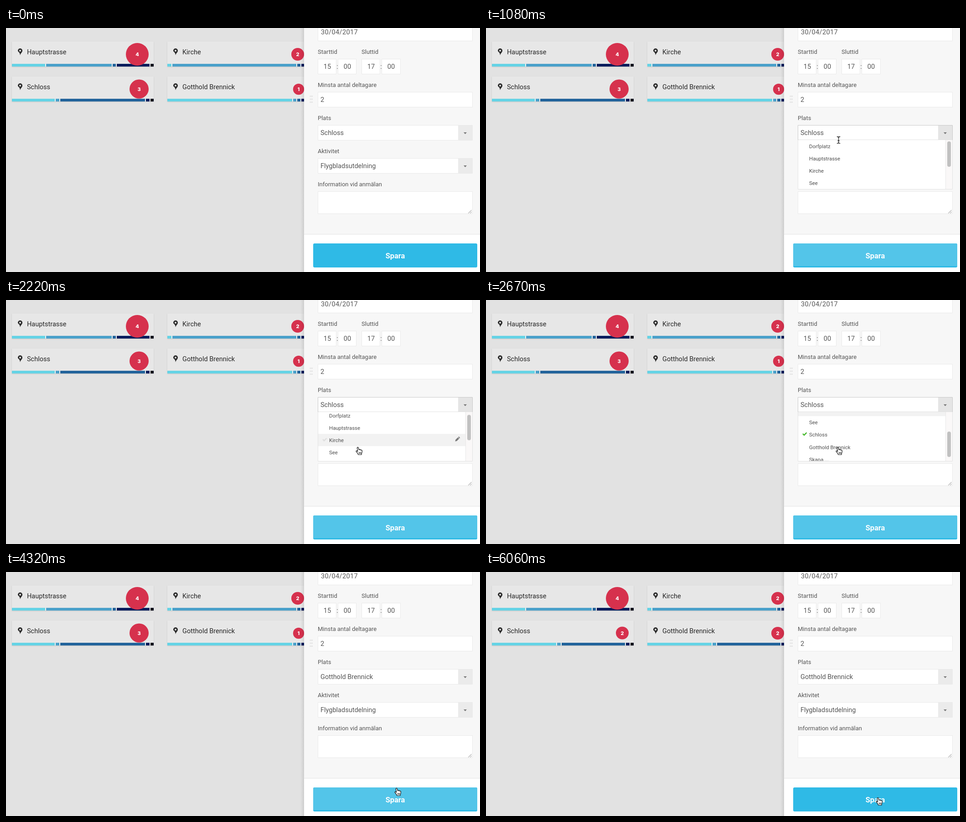
An HTML page for the animation above (6.09 s loop, 1040 px wide and 538 px high).

```html
<!DOCTYPE html>
<html lang="sv">
<head>
<meta charset="utf-8">
<title>Plats</title>
<style>
html, body { margin: 0; width: 100%; height: 100%; overflow: hidden; background: #e2e2e2; }
svg { display: block; width: 1040px; height: 538px; }
text { font: 14.5px Roboto, sans-serif; fill: #555; }
.title { fill: #262626; }
.label { font-size: 13px; }
.mid { text-anchor: middle; }
.row { font-size: 11.4px; fill: #4c4c4c; }
.count { font: 800 11px Inter, sans-serif; fill: #fff; text-anchor: middle; }
.save { font-weight: 700; font-size: 16.4px; fill: #fff; text-anchor: middle; }
.card { fill: #e7e7e7; filter: drop-shadow(0 1px 1px rgba(0,0,0,.13)); }
.field { fill: #fff; stroke: #e9e9e9; }
.c1 { fill: #65d3e5; } .c2 { fill: #4aa0ca; } .c3 { fill: #22639b; } .c4 { fill: #061c5c; } .c5 { fill: #050a1b; }
.badge { fill: #d6314d; }

/* One loop shared by every moving part */
.a { animation: 6090ms infinite both; }
.step { animation-timing-function: step-end; }
.seg { x: var(--x); width: var(--w); animation-name: seg; }
.resize { cx: var(--x); r: var(--r); animation-name: resize; }
.before-pick { animation-name: before-pick; }
.after-pick { animation-name: after-pick; }
.before-save { animation-name: before-save; }
.after-save { animation-name: after-save; }
.open { animation-name: open; }
.focus { animation-name: focus; }
.dirty { animation-name: dirty; }
.over { animation-name: over; }
.hover { animation-name: hover; }
.scroll { animation-name: scroll; }
.thumb { animation-name: thumb; }
.pointer { animation-name: pointer; animation-timing-function: ease-in-out; }
.beam { animation-name: beam; }
.hand { animation-name: hand; }

@keyframes seg {
  0%, 86.2% { x: var(--x); width: var(--w); }
  92.9%, 100% { x: var(--x2); width: var(--w2); }
}
@keyframes resize {
  0%, 86.2% { cx: var(--x); r: var(--r); }
  94.9%, 100% { cx: var(--x2); r: 14px; }
}
@keyframes before-pick { 0% { opacity: 1 } 52.5%, 100% { opacity: 0 } }
@keyframes after-pick { 0% { opacity: 0 } 52.5%, 100% { opacity: 1 } }
@keyframes before-save { 0% { opacity: 1 } 87.5%, 100% { opacity: 0 } }
@keyframes after-save { 0% { opacity: 0 } 87.5%, 100% { opacity: 1 } }
@keyframes open { 0% { opacity: 0 } 16.42% { opacity: 1 } 65%, 100% { opacity: 0 } }
@keyframes focus { 0% { opacity: 0 } 16.42% { opacity: 1 } 52.5%, 100% { opacity: 0 } }
@keyframes dirty { 0% { opacity: 0 } 16.42% { opacity: 1 } 80.3%, 100% { opacity: 0 } }
@keyframes over { 0% { opacity: 0 } 8.2% { opacity: 1 } 65%, 100% { opacity: 0 } }
@keyframes hover {
  0% { opacity: 0; transform: none; }
  29.3% { opacity: 1; transform: none; }
  30.6% { opacity: 1; transform: translateY(27px); }
  31.4% { opacity: 1; transform: translateY(54px); }
  47.3% { opacity: 1; transform: translateY(136px); }
  52.5%, 100% { opacity: 1; transform: translateY(54px); }
}
@keyframes scroll {
  0%, 34.5% { transform: none; animation-timing-function: cubic-bezier(.4,0,.7,.9); }
  43.84% { transform: translateY(-72px); animation-timing-function: ease-out; }
  45.8%, 52.49% { transform: translateY(-81px); }
  52.5%, 100% { transform: none; }
}
@keyframes thumb {
  0%, 34.5% { transform: none; animation-timing-function: cubic-bezier(.4,0,.7,.9); }
  43.84% { transform: translateY(40px); animation-timing-function: ease-out; }
  45.8%, 52.49% { transform: translateY(45px); }
  52.5%, 100% { transform: none; }
}
@keyframes pointer {
  0%, .8% { transform: translate(838px,556px); }
  9.36% { transform: translate(774px,247px); }
  27.09%, 28.57% { transform: translate(773px,247px); }
  33%, 52.5% { transform: translate(772px,325px); }
  58.5%, 64% { transform: translate(781px,316px); }
  70.4%, 71.9% { transform: translate(857px,477px); }
  76.8%, 100% { transform: translate(860px,498px); }
}
@keyframes beam { 0% { opacity: 1 } 29.1%, 100% { opacity: 0 } }
@keyframes hand { 0% { opacity: 0 } 29.1%, 100% { opacity: 1 } }
</style>
</head>
<body>
<svg viewBox="0 0 1040 538">
  <defs>
    <path id="pin" fill="#2a2a2a" fill-rule="evenodd" d="M0 8C-1-.5-5 1.5-5-2A5 5 0 0 1 5-2C5 1.5 1 3.5 0 8ZM0-4A2 2 0 0 0 0 0A2 2 0 0 0 0-4Z"/>
    <path id="tick" fill="none" stroke-width="2.4" d="M695 0l3 3 5.500-5.500"/>
    <g id="arrow"><path fill="#ebebeb" d="M992 0h31v32h-31z"/><path fill="#777" d="M1004 15h7l-3.500 4z"/></g>
    <path id="beam" fill="none" d="M-3.500-7.500Q0-7.500 0-5Q0-7.500 3.500-7.500M0-5V5M-3.500 7.500Q0 7.500 0 5Q0 7.500 3.500 7.500M-2 1.500H2"/>
    <linearGradient id="shade"><stop stop-opacity="0"/><stop offset="1" stop-opacity=".09"/></linearGradient>
    <clipPath id="view"><path d="M685 247h323v108h-323z"/></clipPath>
  </defs>

  <rect width="1040" height="538" fill="#e2e2e2"/>

  <g>
    <path class="card" d="M13 30h311v55h-311z"/>
    <path class="card" d="M354 30h311v55h-311z"/>
    <path class="card" d="M13 107h311v55h-311z"/>
    <path class="card" d="M354 107h311v55h-311z"/>
    <use href="#pin" x="31" y="52"/><text class="title" x="46" y="58">Hauptstrasse</text>
    <use href="#pin" x="372" y="52"/><text class="title" x="387" y="58">Kirche</text>
    <use href="#pin" x="31" y="129"/><text class="title" x="46" y="135">Schloss</text>
    <use href="#pin" x="372" y="129"/><text class="title" x="387" y="135">Gotthold Brennick</text>
  </g>

  <path fill="#f2f2f2" d="M13 79h311v6H13zM354 79h311v6H354zM13 156h311v6H13zM354 156h311v6H354z"/>
  <path class="c1" d="M13 79h73v6H13zM354 79h9v6h-9z"/>
  <path class="c2" d="M88 79h144v6H88zM365 79h272v6H365z"/>
  <path class="c3" d="M234 79h7v6h-7zM639 79h7v6h-7z"/>
  <path class="c4" d="M243 79h72v6h-72zM648 79h7v6h-7zM307 156h8v6h-8zM648 156h7v6h-7z"/>
  <path class="c5" d="M317 79h7v6h-7zM317 156h7v6h-7z"/>
  <g>
    <rect class="a seg c1" y="156" height="6" style="--x:13px;--w:94px;--x2:13px;--w2:141px"/>
    <rect class="a seg c2" y="156" height="6" style="--x:109px;--w:8px;--x2:156px;--w2:8px"/>
    <rect class="a seg c3" y="156" height="6" style="--x:119px;--w:186px;--x2:166px;--w2:139px"/>
    <rect class="a seg c1" y="156" height="6" style="--x:354px;--w:274px;--x2:354px;--w2:141px"/>
    <rect class="a seg c2" y="156" height="6" style="--x:630px;--w:7px;--x2:497px;--w2:8px"/>
    <rect class="a seg c3" y="156" height="6" style="--x:639px;--w:7px;--x2:507px;--w2:139px"/>
  </g>

  <circle class="badge" cx="288" cy="58" r="25"/><text class="count" x="288" y="62">4</text>
  <circle class="badge" cx="640" cy="58" r="14"/><text class="count" x="640" y="62">2</text>
  <circle class="a resize badge" cy="134.500" style="--x:292px;--r:21px;--x2:299px"/>
  <circle class="a resize badge" cy="135" style="--x:642px;--r:12.2px;--x2:640px"/>
  <g class="a step before-save"><text class="count" x="292" y="139">3</text><text class="count" x="642" y="139">1</text></g>
  <g class="a step after-save"><text class="count" x="299" y="139">2</text><text class="count" x="640" y="139">2</text></g>

  <!-- Side panel -->
  <rect x="646" width="8" height="538" fill="url(#shade)"/>
  <rect x="654" width="386" height="538" fill="#f7f7f7"/>
  <path fill="none" stroke="#e6e6e6" stroke-width="3" stroke-dasharray="3 3.500" d="M669.500 149v16M673 149v16" transform="translate(-1.500)"/>

  <g class="field">
    <path d="M684.500-6.500h339v35h-339z"/>
    <path d="M684.500 68.500h40v33h-40zM728.500 68.500h40v33h-40zM780.500 68.500h40v33h-40zM824.500 68.500h41v33h-41z"/>
    <path d="M684.500 141.500h339v33h-339zM684.500 214.500h339v33h-339zM684.500 287.500h339v33h-339zM684.500 360.500h339v49h-339z"/>
  </g>
  <path stroke="#777" d="M1014.500 408.500l7-7M1018.500 408.500l3-3"/>
  <use href="#arrow" y="215"/>
  <use href="#arrow" y="288"/>
  <g class="a step over"><path fill="#e5e5e5" d="M992 215h31v32h-31z"/><path fill="#777" d="M1004 230h7l-3.500 4z"/></g>

  <text x="691" y="14" letter-spacing=".4">30/04/2017</text>
  <text class="label" x="684" y="57">Starttid</text>
  <text class="label" x="780" y="57">Sluttid</text>
  <text class="mid" x="705" y="90">15</text><text class="mid" x="727" y="90">:</text><text class="mid" x="749" y="90">00</text>
  <text class="mid" x="801" y="90">17</text><text class="mid" x="823" y="90">:</text><text class="mid" x="845" y="90">00</text>
  <text class="label" x="684" y="130">Minsta antal deltagare</text>
  <text x="690" y="163">2</text>
  <text class="label" x="684" y="203">Plats</text>
  <text class="a step before-pick" x="690" y="236">Schloss</text>
  <text class="a step after-pick" x="690" y="236">Gotthold Brennick</text>
  <text class="label" x="684" y="276">Aktivitet</text>
  <text x="690" y="309">Flygbladsutdelning</text>
  <text class="label" x="684" y="349">Information vid anmälan</text>

  <!-- Place list -->
  <g class="a step open">
    <path fill="#fff" stroke="#e2e2e2" d="M684.500 246.500h339v109h-339z"/>
    <path fill="#faf8f8" d="M1008 247h15v108h-15z"/>
    <path stroke="#e8e8e8" d="M1008.500 247v108"/>
    <rect class="a thumb" x="1012" y="250" width="8" height="56" rx="4" fill="#c1c1c1"/>
    <g clip-path="url(#view)">
      <g class="a scroll">
        <g class="a step hover">
          <path fill="#f2f2f2" d="M685 247h323v27h-323z"/>
          <use href="#tick" y="259" stroke="#dedede"/>
          <path fill="#777" transform="translate(990 259) rotate(45)" d="M-2-4h4v7l-2 3.500-2-3.500zM-2-7h4v2h-4z"/>
        </g>
        <use class="a step before-pick" href="#tick" y="367" stroke="#3cb521"/>
        <use class="a step after-pick" href="#tick" y="395" stroke="#3cb521"/>
        <text class="row" x="709" y="265">Dorfplatz</text>
        <text class="row" x="709" y="292">Hauptstrasse</text>
        <text class="row" x="709" y="319">Kirche</text>
        <text class="row" x="709" y="346">See</text>
        <text class="row" x="709" y="373">Schloss</text>
        <text class="row" x="709" y="401">Gotthold Brennick</text>
        <text class="row" x="709" y="428">Skapa ...</text>
      </g>
    </g>
  </g>
  <path class="a step focus" fill="none" stroke="#c9c9c9" d="M684.500 247v-32.500h339v32.500"/>

  <!-- Footer -->
  <path fill="#fff" d="M654 455h386v83H654z"/>
  <path fill="#ebebeb" d="M654 454h386v1.500H654z"/>
  <rect x="674" y="475" width="360" height="53" rx="3" fill="#2fbae6"/>
  <path class="a step dirty" fill="#53c5e9" d="M674 525v-47q0-3 3-3h354q3 0 3 3v47z"/>
  <text class="save" x="854" y="508">Spara</text>

  <g class="a pointer">
    <g class="a step beam">
      <use href="#beam" stroke="#fff" stroke-width="3"/>
      <use href="#beam" stroke="#111" stroke-width="1.300"/>
    </g>
    <g class="a step hand" stroke="#111" stroke-width="1.200" stroke-linejoin="round">
      <path fill="#fff" d="M-1.600 1.200C-1.800-.8 1-1 1.300.9L2.200 5.200C2.600 3.900 4.600 4 4.800 5.600C5.400 4.600 7 4.800 7.200 6.200C8 5.500 9.300 6 9.300 7.600C9.400 10 9 12 8.200 13.500L8 16H.8L0 14C-1.200 12-2.400 10.800-3.600 9.200C-4.600 7.800-2.800 6.800-1.600 7.800L-.3 9Z"/>
      <path fill="none" stroke-width="1" d="M2.500 10.500v3.500M4.500 10.500v3.500M6.500 10.500v3.500"/>
    </g>
  </g>
</svg>
</body>
</html>
```
